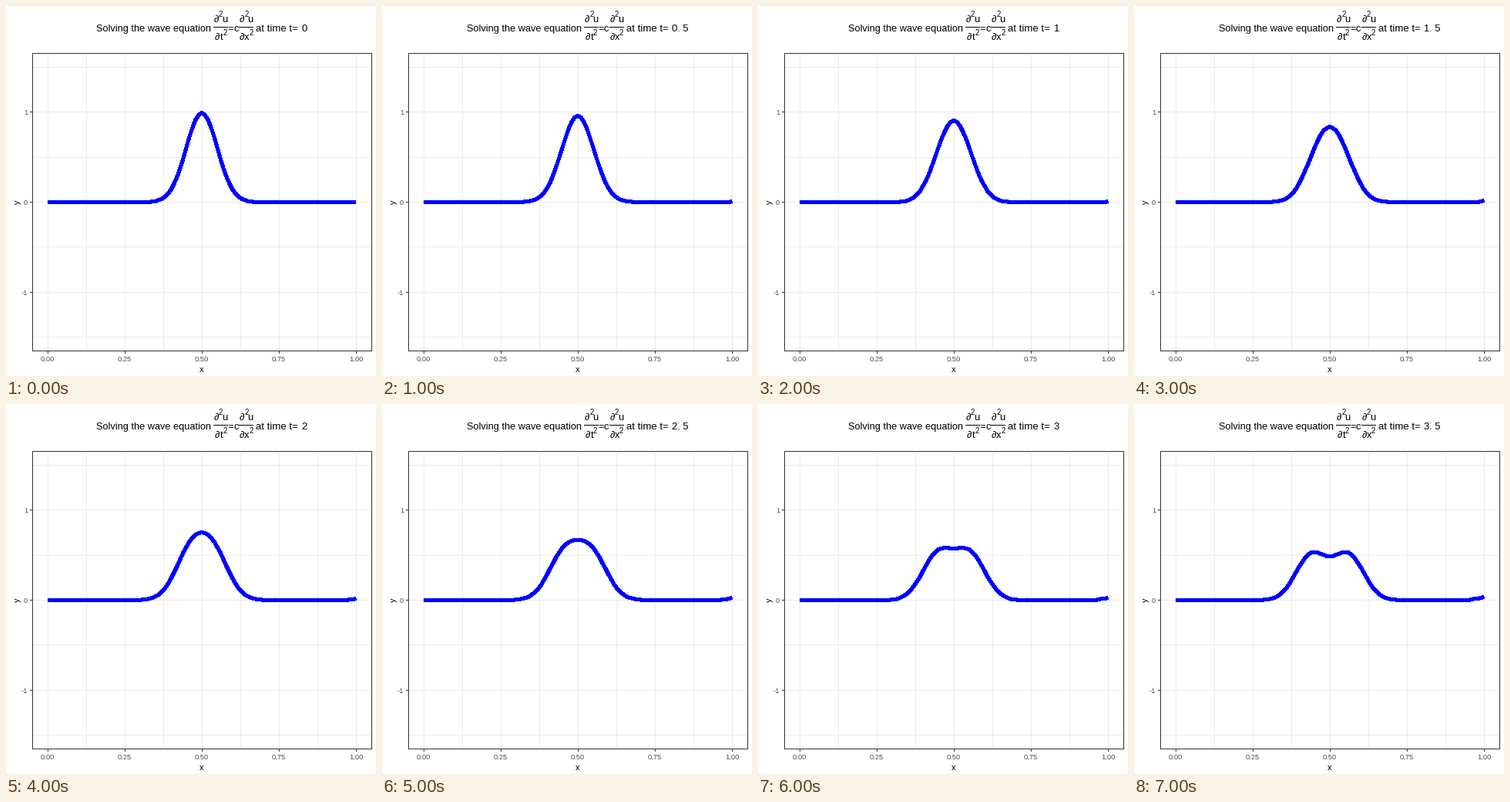
A matplotlib script that plays this animation: 480x480 px, repeating every 8000 ms.

```python
import matplotlib.pyplot as plt
import numpy as np
from matplotlib.animation import FuncAnimation
from matplotlib.patches import Rectangle

plt.rcParams["font.family"] = ["Liberation Sans", "DejaVu Sans"]
plt.rcParams["path.simplify"] = False

SIZE = 480
LEFT, RIGHT, TOP, BOTTOM = 34, 474, 61, 447
X0, Y0 = 54, 254.45
X_UNIT, Y_UNIT = 400, 116.8
GRID, DARK, LABEL = "#ebebeb", "#333333", "#4d4d4d"
STEP = 0.0075

fig = plt.figure(figsize=(SIZE / 72, SIZE / 72), dpi=72, facecolor="white")
ax = fig.add_axes([0, 0, 1, 1])
ax.set(xlim=(0, SIZE), ylim=(SIZE, 0))
ax.axis("off")


def bar(x, y, w, h, color):
    patch = Rectangle((x, y), w, h, fc=color, lw=0, antialiased=False)
    return ax.add_patch(patch)


def label(x, y, text, size, color="black", ha="left", **kw):
    return ax.text(x, y, text, fontsize=size, color=color, ha=ha,
                   va=kw.pop("va", "baseline"), **kw)


def px(x):
    return round(X0 + X_UNIT * x)


def py(y):
    return np.floor(Y0 - Y_UNIT * np.asarray(y))


# Panel: grid, frame, ticks and axis labels
for v in np.arange(0, 1.01, 0.125):
    bar(px(v), TOP, 1, BOTTOM - TOP, GRID)
for v in np.arange(-1.5, 1.6, 0.5):
    bar(LEFT, py(v), RIGHT - LEFT, 1, GRID)
for x in (LEFT, RIGHT):
    bar(x, TOP, 1, BOTTOM - TOP + 1, DARK)
for y in (TOP, BOTTOM):
    bar(LEFT, y, RIGHT - LEFT + 1, 1, DARK)
for v in np.arange(0, 1.01, 0.25):
    bar(px(v), BOTTOM + 1, 1, 3, DARK)
    label(px(v), 461, f"{v:.2f}", 9.2, LABEL, "center")
for v in (-1, 0, 1):
    bar(LEFT - 3, py(v), 3, 1, DARK)
    label(28, py(v) + 4, str(v), 9.2, LABEL, "right")
label(254, 475, "x", 11, ha="center")
label(15, 254, "y", 11, ha="center", va="center", rotation=90)

# Title pieces: x, baseline, text, size
PIECES = [
    (117, 33, "Solving the wave equation", 12.7),
    (270, 21, "∂", 13), (276, 14, "2", 9.5), (280, 21, "u", 13),
    (271, 44, "∂", 13), (278, 44, "t", 13), (281, 38, "2", 9.5),
    (287, 33, "=", 13), (295, 33, "c", 13),
    (303, 21, "∂", 13), (309, 14, "2", 9.5), (313, 21, "u", 13),
    (303, 44, "∂", 13), (309, 44, "x", 13), (315, 38, "2", 9.5),
    (324, 33, "at time t=", 13.3),
]
title = [(label(*p), p[0]) for p in PIECES]
rules = [(bar(x, 27, 19, 1, "black"), x) for x in (269, 302)]
clock = label(383.5, 33, "0", 13)

# Without antialiasing every touched pixel is filled, so 4.1 shows as 5 px
xs = np.linspace(0, 1, 101)
wave, = ax.plot([], [], color="#0000ff", lw=4.1, antialiased=False,
                solid_capstyle="butt", solid_joinstyle="round", zorder=5)


def bump(x):
    return np.exp(-200 * (x - 0.5) ** 2)


def draw(k):
    d = STEP * (k + 1)
    u = (bump(xs - d) + bump(xs + d)) / 2
    u += 0.57 * np.maximum(0, STEP * k - (1 - xs))  # leak at the right edge
    wave.set_data(X0 + X_UNIT * xs, py(u) + 0.5)

    whole, half = divmod(k, 2)
    shift = 7 * half
    for item, x in title + rules:
        item.set_x(x - shift)
    clock.set_x(383.5 - shift)
    clock.set_text(f"{whole}. 5" if half else str(whole))
    return wave, clock


anim = FuncAnimation(fig, draw, frames=8, interval=1000, repeat=True,
                     repeat_delay=0, blit=False)
plt.show()
```
